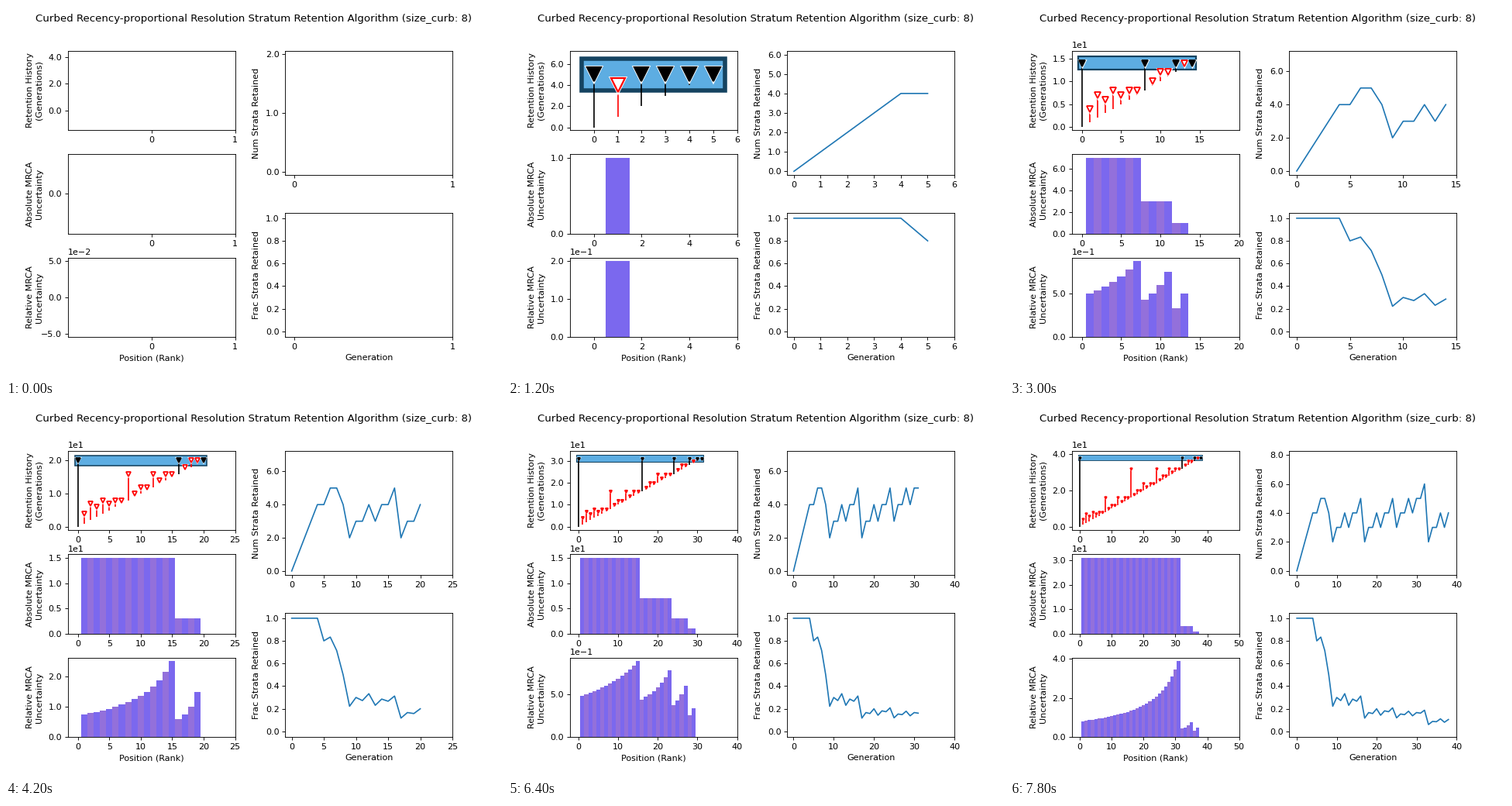
Recreate the animation shown at these times as a matplotlib script. Size 640 px wide and 480 px high, loop 8000 ms.

```python
import math

import matplotlib.pyplot as plt
from matplotlib.animation import FuncAnimation
from matplotlib.patches import Rectangle
from matplotlib.ticker import FixedFormatter, FixedLocator

plt.rcParams["font.family"] = "DejaVu Sans"

CURB = 8
FRAMES, INTERVAL = 40, 200
BOX_FILL, BOX_EDGE = "#5dade2", "#154360"
BAR_COLORS = ("mediumpurple", "mediumslateblue")
FLAT = (-0.055, 0.055)
EARLY_DROPS = (math.inf, 4, 7, 6, 8, 7, 8, 8)

fig = plt.figure(figsize=(8, 6), dpi=80)
fig.subplots_adjust(wspace=0.3, hspace=0.3)
fig.suptitle("Curbed Recency-proportional Resolution Stratum Retention "
             f"Algorithm (size_curb: {CURB})")
history, absolute, relative = (fig.add_subplot(3, 2, i) for i in (1, 3, 5))
count, fraction = (fig.add_subplot(2, 2, i) for i in (2, 4))


def drop_time(rank):
    """Generation at which a stratum is discarded."""
    if rank < len(EARLY_DROPS):
        return EARLY_DROPS[rank]
    return rank + (rank & -rank)


def num_retained(gen):
    return sum(drop_time(r) >= gen for r in range(gen))


def uncertainty(gen):
    """Absolute gap width around every rank from 1 to gen."""
    kept = [r for r in range(gen + 1) if drop_time(r) > gen]
    gaps = []
    for rank in range(1, gen + 1):
        above = [k for k in kept if k > rank]
        below = [k for k in kept if k <= rank]
        gaps.append(above[0] - below[-1] - 1 if above else 0)
    return gaps


def nice_step(span, bins):
    raw = span / bins
    power = 10 ** math.floor(math.log10(raw))
    return next(m * power for m in (1, 2, 5, 10) if m * power >= raw * (1 - 1e-9))


def rank_ticks(low, high):
    """Whole ticks from zero to the first one at or past high."""
    step = max(1, round(nice_step(high - low, 6)))
    last = math.ceil(high / step - 1e-9)
    return [i * step for i in range(last + 1)]


def set_x(ax, ticks, low, high):
    ax.xaxis.set_major_locator(FixedLocator(ticks))
    ax.xaxis.set_major_formatter(FixedFormatter([str(t) for t in ticks]))
    ax.set_xlim(low, high)


def set_y(ax, low, high, bins, whole=True):
    step = nice_step(high - low, bins)
    if whole and math.floor(high) - math.ceil(low) >= 1:
        step = max(1, step)
    first, last = math.ceil(low / step), math.floor(high / step + 1e-9)
    ticks = [i * step for i in range(first, last + 1)]
    if ax is absolute:
        ticks = [t for t in ticks if abs(t - round(t)) < 1e-9]
    top = max(abs(t) for t in ticks)
    order = math.floor(math.log10(top) + 1e-9) if top else 0
    labels = [f"{t / 10 ** order:.1f}".replace("-", "\N{MINUS SIGN}") for t in ticks]
    form = FixedFormatter(labels)
    if order:
        form.set_offset_string(f"1e{order}".replace("-", "\N{MINUS SIGN}"))
    ax.yaxis.set_major_locator(FixedLocator(ticks))
    ax.yaxis.set_major_formatter(form)
    ax.set_ylim(low, high)


def reset(ax, ylabel, xlabel=""):
    ax.cla()
    ax.set_ylabel(ylabel)
    ax.set_xlabel(xlabel)
    ax.yaxis.set_label_coords(-0.15, 0.5)


def draw_triangle(x, y, size, edge, fill, z):
    width = 1.4 + 0.03 * size
    style = dict(marker="v", markersize=0.8 * size, linestyle="none")
    history.plot(x, y, color="white", markeredgewidth=width + 0.08 * size,
                 zorder=z, **style)
    history.plot(x, y, markerfacecolor=fill, markeredgecolor=edge,
                 markeredgewidth=width, zorder=z + 0.1, **style)


def draw_history(gen):
    scale = min(1, 6 / (gen + 1))
    history.add_patch(Rectangle((-0.5, gen - 1.5), gen + 1, 3, facecolor=BOX_FILL,
                                edgecolor=BOX_EDGE, linewidth=5 * scale))
    for rank in range(gen + 1):
        drop = drop_time(rank)
        alive = drop > gen
        top = gen if alive else drop
        color, fill = ("black", "black") if alive else ("red", "white")
        history.plot([rank, rank], [rank, top], color=color, linewidth=1.5,
                     solid_capstyle="butt", zorder=2)
        draw_triangle(rank, top, 20 * scale, color, fill, 3 + rank / 100)


def draw_bars(ax, heights):
    ranks = range(1, len(heights) + 1)
    ax.bar(ranks, heights, width=1, color=[BAR_COLORS[r % 2] for r in ranks])
    peak = max(heights, default=0)
    low, high = (0, 1.05 * peak) if peak else FLAT
    set_y(ax, low, high, 4)


def update(frame):
    reset(history, "Retention History\n(Generations)")
    reset(absolute, "Absolute MRCA\nUncertainty")
    reset(relative, "Relative MRCA\nUncertainty", "Position (Rank)")
    reset(count, "Num Strata Retained")
    reset(fraction, "Frac Strata Retained", "Generation")

    gen = max(frame - 1, 0)
    if frame:
        draw_history(gen)
    gaps = uncertainty(gen)
    draw_bars(absolute, gaps)
    draw_bars(relative, [g / (gen - i) for i, g in enumerate(gaps)])
    set_y(history, min(-0.05 * gen, gen - 1.5),
          1.05 * gen + 2 if gen else 4.5, 4)

    gens = range(gen + 1)
    kept = [num_retained(g) for g in gens]
    count.plot(gens, kept, color="tab:blue")
    fraction.plot(gens, [k / g if g else 1 for g, k in zip(gens, kept)],
                  color="tab:blue")
    margin = 0.05 * max(kept) or FLAT[1]
    set_y(count, -margin, max(kept) + margin + 2, 7)
    set_y(fraction, -0.05, 1.05, 7, whole=False)

    pad = 0.05 * gen or FLAT[1]
    gen_ticks = rank_ticks(-pad, gen + pad)
    for ax in (count, fraction):
        set_x(ax, gen_ticks, -pad, gen_ticks[-1])

    edge = 0.5 + 0.05 * (gen + 1)
    ticks = rank_ticks(-edge, gen + edge)
    low = min(-1, -edge)
    set_x(history, gen_ticks, low, ticks[-1])
    for ax in (absolute, relative):
        set_x(ax, ticks, low, ticks[-1])
    return []


anim = FuncAnimation(fig, update, frames=FRAMES, interval=INTERVAL,
                     repeat=True, repeat_delay=0, blit=False)
plt.show()
```
